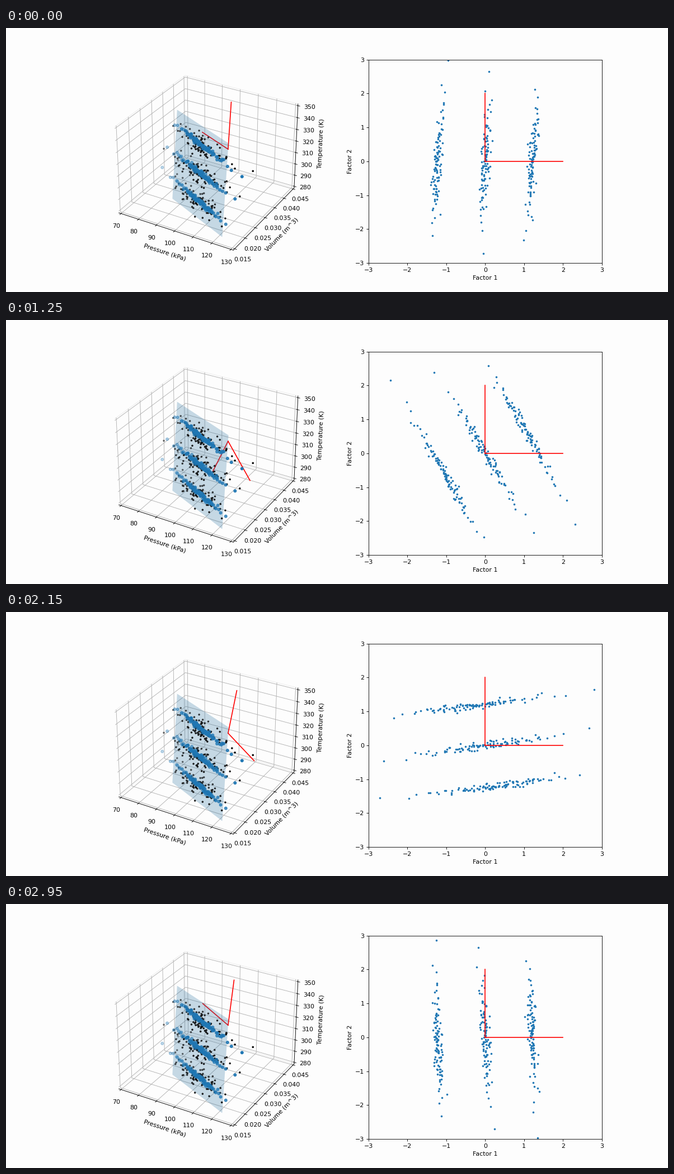
Write a matplotlib script that moves like this. It is 1183 by 473 pixels and loops after 3000 ms.

```python
import numpy as np
import matplotlib.pyplot as plt
from matplotlib.animation import FuncAnimation
from mpl_toolkits.mplot3d.art3d import Poly3DCollection

FRAMES, INTERVAL = 60, 50
WIDTH, HEIGHT, DPI = 1183, 473, 78.87
BG, BLUE, RED = "#fdfdfd", "#1f77b4", "red"

# Ideal gas state: pressure, volume, temperature
MEAN = np.array([100, 0.0258, 310])
SPREAD = np.array([10, 0.0026, 16.6])
LOADINGS = np.array([[-0.8, 0.00136, 17.0], [-9.85, 0.0025, -0.85]])
OFF_PLANE = np.array([2, 0.0035, 0])
ARROW_ORIGIN = MEAN + 1.2 * SPREAD


def make_scores(rng, size=100):
    """Three temperature groups, long-tailed along the second factor."""
    share = (np.arange(size) + 0.5) / size
    tails = 0.5 * np.log(share / (1 - share))
    groups = []
    for center in (-1.22, 0, 1.22):
        second = tails - 0.06 * center * (tails ** 2 - 0.8)
        second += rng.normal(0, 0.06, size)
        first = center + 0.055 * second + rng.normal(0, 0.065, size)
        groups.append(np.column_stack([first, second]))
    return np.vstack(groups)


def to_space(scores):
    return MEAN + np.asarray(scores) @ LOADINGS


def rotation(angle):
    c, s = np.cos(angle), np.sin(angle)
    return np.array([[c, s], [-s, c]])


rng = np.random.default_rng(7)
scores = make_scores(rng)
projected = to_space(scores)
residual = 0.08 * (scores[:, 1] ** 2 - 1) + rng.normal(0, 0.4, len(scores))
measured = projected + residual[:, None] * OFF_PLANE

# The small surplus keeps rounding from losing a pixel
fig = plt.figure(figsize=((WIDTH + 0.01) / DPI, (HEIGHT + 0.01) / DPI),
                 dpi=DPI, facecolor=BG)

space = fig.add_subplot(1, 2, 1, projection="3d", computed_zorder=False,
                        facecolor=BG)
space.set_xlim(70, 130, view_margin=1 / 48)
space.set_ylim(0.015, 0.045, view_margin=1 / 48)
space.set_zlim(280, 350, view_margin=1 / 48)
space.set(xlabel="Pressure (kPa)", ylabel="Volume (m^3)",
          zlabel="Temperature (K)")
for axis in (space.xaxis, space.yaxis, space.zaxis):
    axis.pane.set(facecolor=BG, edgecolor="#efefef", alpha=1)

corners = to_space([(2, 2), (2, -2), (-2, -2), (-2, 2)])
space.add_collection3d(Poly3DCollection(
    [corners], facecolors=[(0.12, 0.42, 0.61, 0.25)], linewidths=0, zorder=3))
space.scatter(*measured.T, s=5, color="black", zorder=4)
space.scatter(*projected.T, s=20, color=BLUE, zorder=5)
arrows = [space.plot([], [], [], color=RED, zorder=2)[0] for _ in range(2)]

plane = fig.add_subplot(1, 2, 2, facecolor=BG)
plane.set(xlim=(-3, 3), ylim=(-3, 3), xlabel="Factor 1", ylabel="Factor 2")
dots = plane.scatter(*scores.T, s=5, color=BLUE)
plane.plot([0, 2], [0, 0], color=RED)
plane.plot([0, 0], [0, 2], color=RED)


def update(frame):
    turn = rotation(2 * np.pi * frame / FRAMES)
    dots.set_offsets(scores @ turn.T)
    for arrow, direction in zip(arrows, turn @ LOADINGS):
        ends = np.array([ARROW_ORIGIN, ARROW_ORIGIN + 2 * direction])
        arrow.set_data_3d(*ends.T)
    return [dots, *arrows]


anim = FuncAnimation(fig, update, frames=FRAMES, interval=INTERVAL,
                     init_func=lambda: update(0), repeat=True, repeat_delay=0)
plt.show()
```
